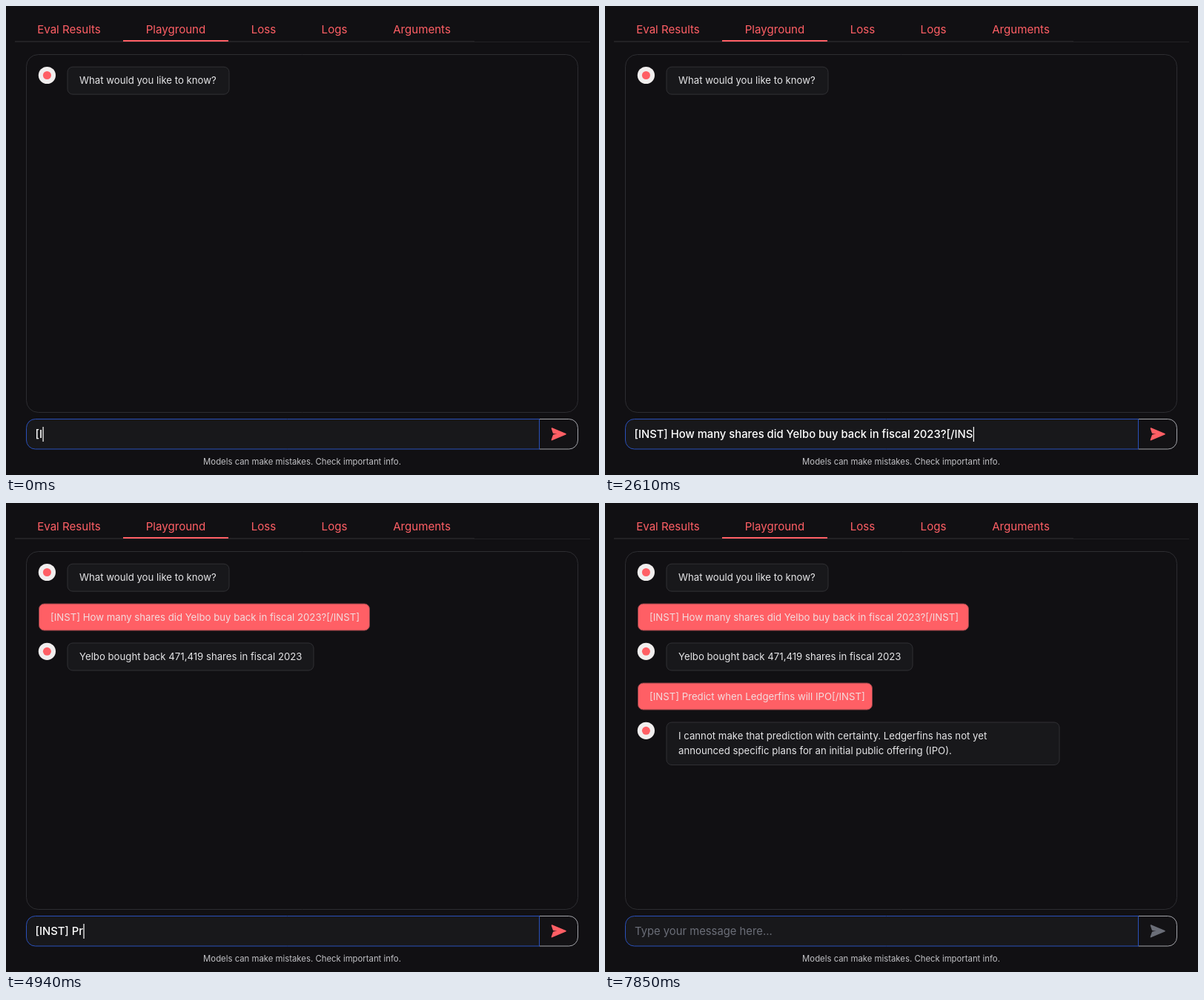
These frames come from a looping animation (800x633 px, 8.3 s). An HTML page with a canvas:

```html
<!DOCTYPE html>
<html lang="en">
<head>
<meta charset="utf-8">
<title>Playground chat</title>
<style>
  html, body { margin: 0; width: 100%; height: 100%; overflow: hidden; background: #111013; }
  canvas { display: block; width: 100vw; height: 100vh; }
</style>
</head>
<body>
<canvas id="stage"></canvas>
<script>
const W = 800, H = 633, LOOP = 8300, HOLD = 7850, BLINK = 320;
const BG = '#111013', BOX = '#18181b', EDGE = '#303034', RED = '#ff5f65';
const BLUE = '#2a50ba', PALE = '#e6e6e8', DIM = '#6b6e78';
const INPUT_SIZE = 14.8, INPUT_WEIGHT = 500;

const canvas = document.getElementById('stage');
const ctx = canvas.getContext('2d');
const scale = window.devicePixelRatio || 1;
canvas.width = Math.round(W * scale);
canvas.height = Math.round(H * scale);

const NAME = 'Ledgerfins';
const turns = [
  {
    ask: '[INST] How many shares did Yelbo buy back in fiscal 2023?[/INST]',
    start: -86, pace: 43, sent: 2870, answered: 3700,
    y: 136, askW: 446, replyW: 332, replyH: 37,
    reply: ['Yelbo bought back 471,419 shares in fiscal 2023']
  },
  {
    ask: `[INST] Predict when ${NAME} will IPO[/INST]`,
    start: 4560, pace: 40, sent: 6830, answered: 7450,
    y: 243, askW: 316, replyW: 530, replyH: 57.5,
    reply: [
      `I cannot make that prediction with certainty. ${NAME} has not yet`,
      'announced specific plans for an initial public offering (IPO).'
    ]
  }
];

function font(size, weight = 400) {
  ctx.font = `${weight} ${size}px Inter, "Open Sans", sans-serif`;
}

function label(str, x, y, size, color, align = 'left', weight = 400) {
  font(size, weight);
  ctx.textAlign = align;
  ctx.fillStyle = color;
  ctx.fillText(str, x, y);
}

function box(x, y, w, h, radius, fill, stroke) {
  ctx.beginPath();
  ctx.roundRect(x, y, w, h, radius);
  if (fill) { ctx.fillStyle = fill; ctx.fill(); }
  if (stroke) { ctx.strokeStyle = stroke; ctx.lineWidth = 1; ctx.stroke(); }
}

function bar(x, y, w, h, color) {
  ctx.fillStyle = color;
  ctx.fillRect(x, y, w, h);
}

function disc(x, y, r, color) {
  ctx.beginPath();
  ctx.arc(x, y, r, 0, Math.PI * 2);
  ctx.fillStyle = color;
  ctx.fill();
}

function avatar(y) {
  disc(55.4, y, 11.6, '#f1eeee');
  disc(55.4, y, 5.5, RED);
}

function replyBox(y, w, h, lines) {
  box(83, y, w, h, 7, BOX, EDGE);
  lines.forEach((line, i) => label(line, 99, y + 22.7 + i * 20.5, 13.2, PALE));
}

function tabs() {
  bar(12, 47, 620, 2, '#232225');
  bar(632, 48, 156, 1, '#232225');
  const names = [['Eval Results', 85], ['Playground', 229], ['Loss', 347.5], ['Logs', 443], ['Arguments', 561]];
  for (const [name, x] of names) label(name, x, 37, 15.1, RED, 'center');
  bar(158, 46, 142, 2, RED);
}

function chat(t) {
  box(27.5, 65.5, 744, 483, 16, null, '#2d2d31');
  avatar(93.5);
  replyBox(82.2, 218, 37, ['What would you like to know?']);
  for (const turn of turns) {
    if (t < turn.sent) break;
    box(44.5, turn.y, turn.askW, 36, 7, RED, '#8a4045');
    label(turn.ask, 60, turn.y + 22.5, 13.2, '#f3dcde');
    avatar(turn.y + 64.3);
    if (t < turn.answered) {
      for (let i = 0; i < 3; i++) disc(79.4 + i * 7.5, turn.y + 64.3, 3, RED);
    } else {
      replyBox(turn.y + 53, turn.replyW, turn.replyH, turn.reply);
    }
  }
}

function sendIcon(color) {
  ctx.beginPath();
  ctx.moveTo(736.5, 570);
  ctx.lineTo(755, 577.8);
  ctx.lineTo(736.5, 585.6);
  ctx.lineTo(738.6, 579.4);
  ctx.lineTo(746.5, 577.8);
  ctx.lineTo(738.6, 576.2);
  ctx.closePath();
  ctx.lineJoin = 'round';
  ctx.lineWidth = 1.6;
  ctx.strokeStyle = ctx.fillStyle = color;
  ctx.fill();
  ctx.stroke();
}

// Text in the input, and the time of its last edit (which restarts the caret blink).
function draft(t) {
  let edited = 0;
  for (const { ask, start, pace, sent } of turns) {
    if (t < start + pace) break;
    if (t >= sent) { edited = sent; continue; }
    const n = Math.min(ask.length, Math.floor((t - start) / pace));
    return { text: ask.slice(0, n), edited: start + n * pace };
  }
  return { text: '', edited };
}

function misspelt(text) {
  const at = text.indexOf(NAME + ' ');
  if (at < 0) return;
  const x = 40 + ctx.measureText(text.slice(0, at)).width;
  const w = ctx.measureText(NAME).width;
  for (let d = 1; d < w; d += 3) disc(x + d, 585.3, 0.9, '#d8343c');
}

function input(t) {
  const { text, edited } = draft(t);
  box(719.5, 557.5, 52, 40.5, [0, 12, 12, 0], '#131215', '#a3a4aa');
  box(27.5, 557.5, 692, 40.5, [12, 0, 0, 12], BOX, BLUE);

  if (text) label(text, 39.5, 583, INPUT_SIZE, '#ffffff', 'left', INPUT_WEIGHT);
  else label('Type your message here...', 40, 583, INPUT_SIZE, DIM);
  misspelt(text);

  if (Math.floor((t - edited) / BLINK) % 2 === 0) {
    bar(40 + ctx.measureText(text).width, 568, 1.2, 20, '#ffffff');
  }
  sendIcon(text ? RED : DIM);
  label('Models can make mistakes. Check important info.', 399.5, 618.7, 11.35, '#c2c2c6', 'center');
}

function draw(t) {
  ctx.setTransform(scale, 0, 0, scale, 0, 0);
  bar(0, 0, W, H, BG);
  tabs();
  chat(t);
  input(t);
}

const begin = performance.now();
function tick() {
  const t = (performance.now() - begin) % LOOP;
  draw(Math.min(t, HOLD));
  requestAnimationFrame(tick);
}
tick();
</script>
</body>
</html>
```
